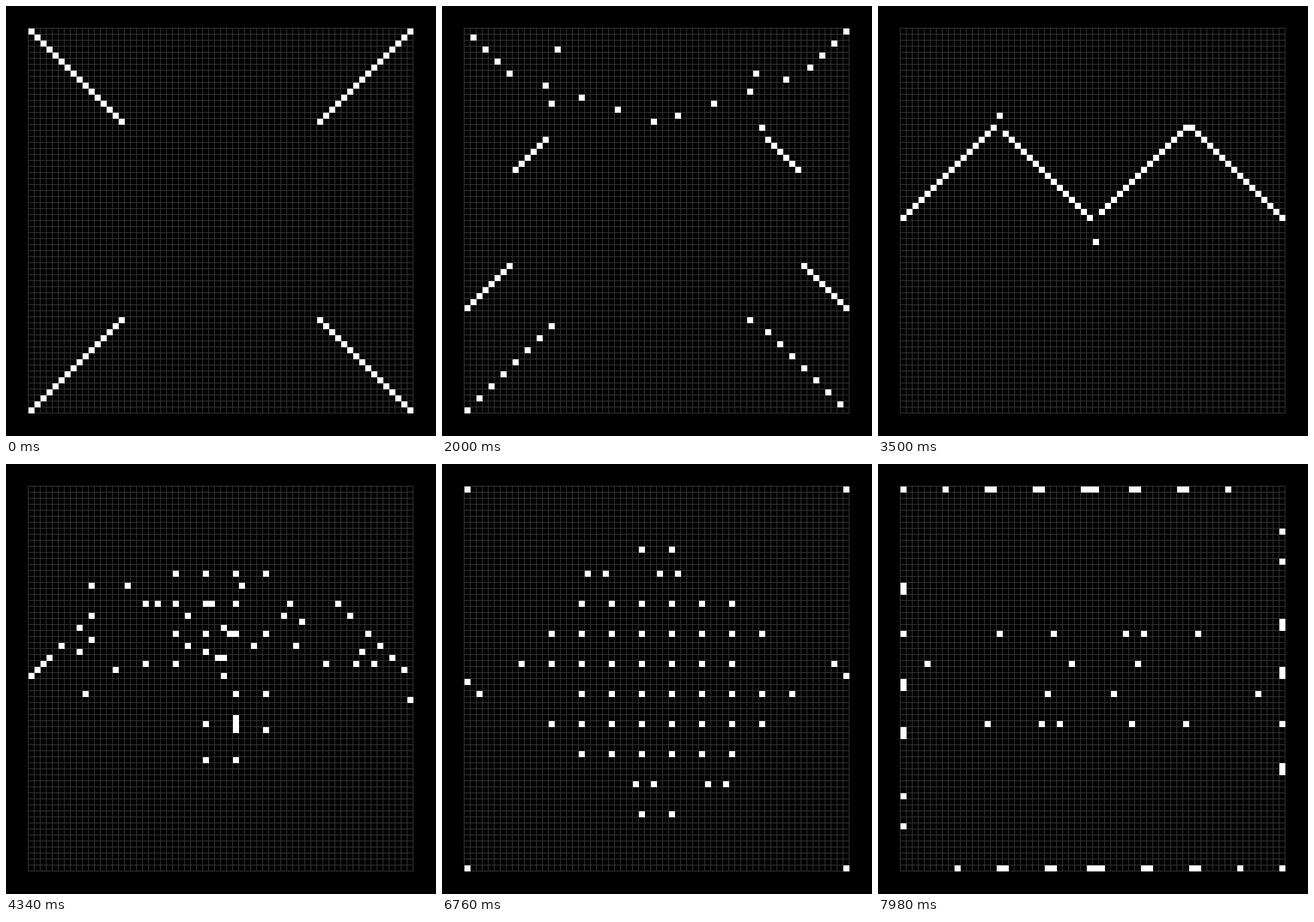
An HTML page that plays this animation: 572 px wide and 572 px high, repeating every 8000 ms.

```html
<!DOCTYPE html>
<html lang="en">
<head>
<meta charset="utf-8">
<title>Dot formations</title>
<style>
  html, body { margin: 0; width: 100%; height: 100%; overflow: hidden; background: #000; }
  svg { display: block; width: 572px; height: 572px; }
</style>
</head>
<body>
<svg viewBox="0 0 572 572" shape-rendering="crispEdges">
  <rect width="572" height="572" fill="#000"/>
  <path id="grid" fill="none" stroke="#333"/>
  <g id="dots" fill="#fff"></g>
</svg>
<script>
const N = 64, CELL = 8, EDGE = 30, LAST = N - 1;
const LOOP = 8000, TICK = 20, FIRST = 1020, LEG = 2600;

// Formations: 64 cells each, in row-major order
function formation(build) {
  const cells = [];
  build((x, y) => cells.push([x, y]));
  return cells.sort((a, b) => a[1] - b[1] || a[0] - b[0]);
}

const cross = formation(add => {
  for (let i = 0; i < 16; i++)
    for (const x of [i, LAST - i])
      for (const y of [i, LAST - i]) add(x, y);
});

const zigzag = formation(add => {
  for (let x = 0; x < N; x++) {
    const j = x & 15;
    add(x, 16 + (x & 16 ? j : 15 - j));
  }
});

const diamond = formation(add => {
  for (const x of [0, LAST])
    for (const y of [0, LAST]) add(x, y);
  for (let r = 0; r < 10; r++) {
    const half = Math.min(r + 1, 10 - r);
    for (let c = -half; c < half; c++) add(34 + 5 * c, Math.max(10, 9 + 5 * r));
  }
});

const border = formation(add => {
  for (let i = 0; i < N; i += 8)
    for (const a of [i, i + 1]) {
      const b = a + 6;
      add(b, 0);
      add(LAST, b);
      add(a, LAST);
      add(0, a);
    }
});

const stages = [cross, zigzag, diamond, border];

let lines = "";
for (let i = 0; i <= N; i++) {
  const p = EDGE - 0.5 + i * CELL;
  lines += `M${p} 29V542M29 ${p}H542`;
}
document.getElementById("grid").setAttribute("d", lines);

const group = document.getElementById("dots");
const dots = cross.map(() => {
  const dot = document.createElementNS("http://www.w3.org/2000/svg", "rect");
  dot.setAttribute("width", CELL);
  dot.setAttribute("height", CELL);
  return group.appendChild(dot);
});

// A dot waits as many ticks as its trip is long, then goes across, then up or down
function walk([x0, y0], [x1, y1], tick) {
  const dx = x1 - x0, dy = y1 - y0;
  const wide = Math.abs(dx), trip = wide + Math.abs(dy);
  const gone = Math.max(0, Math.min(trip, tick - trip));
  const across = Math.min(gone, wide);
  return [x0 + Math.sign(dx) * across, y0 + Math.sign(dy) * (gone - across)];
}

function draw(time) {
  const leg = Math.max(0, Math.floor((time - FIRST) / LEG));
  const tick = Math.floor((time - FIRST - leg * LEG) / TICK);
  dots.forEach((dot, i) => {
    const [x, y] = walk(stages[leg][i], stages[leg + 1][i], tick);
    dot.setAttribute("x", EDGE + x * CELL);
    dot.setAttribute("y", EDGE + y * CELL);
  });
}

function loop() {
  draw(performance.now() % LOOP);
  requestAnimationFrame(loop);
}
loop();
</script>
</body>
</html>
```
